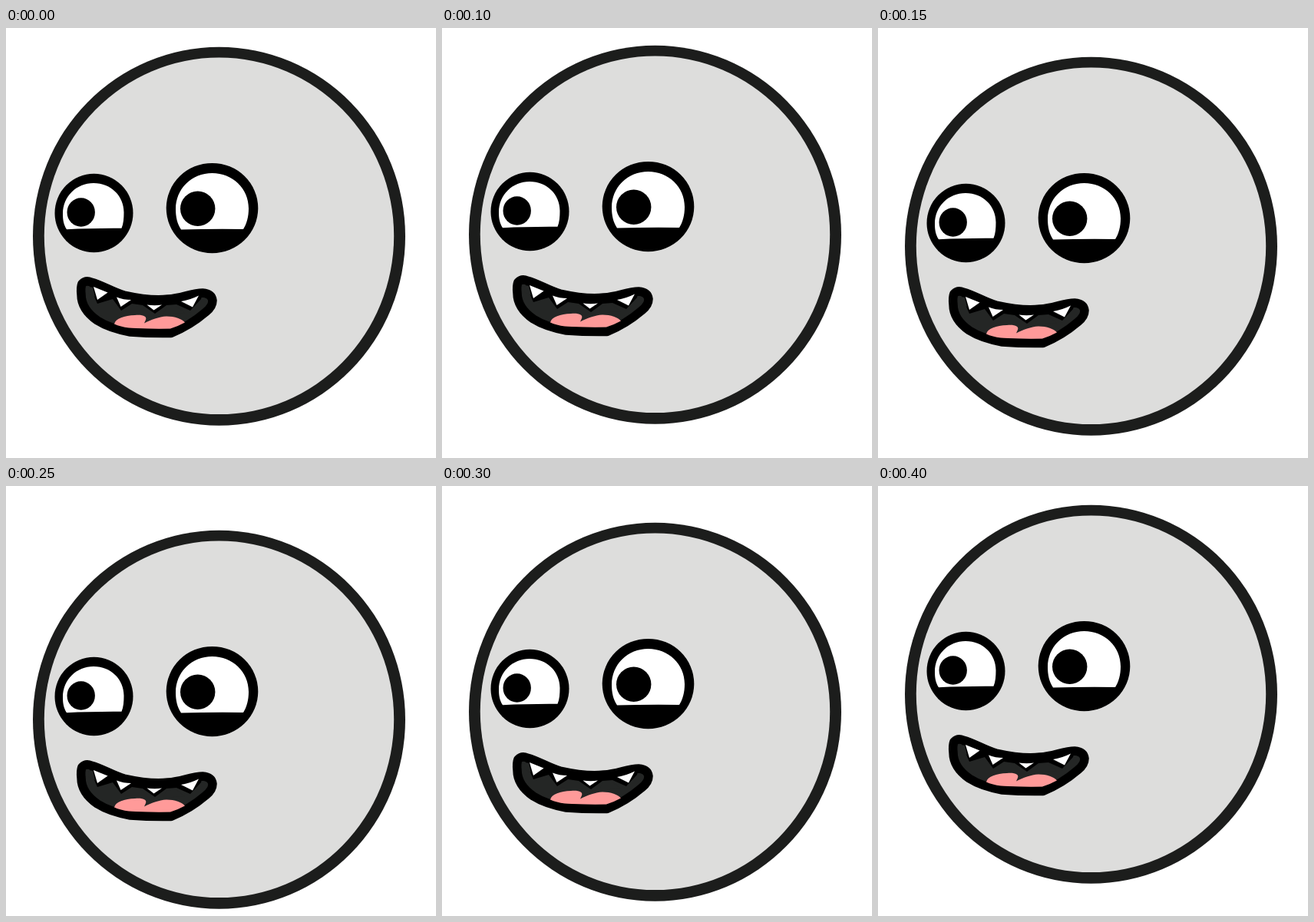
Recreate the animation shown at these times as an HTML page with a canvas. Size 560 by 560 pixels, loop 450 ms.

```html
<!DOCTYPE html>
<html lang="en">
<head>
<meta charset="utf-8">
<title>Bouncing face</title>
<style>
  html, body { margin: 0; width: 100%; height: 100%; overflow: hidden; background: #fff; }
  canvas { display: block; width: 560px; height: 560px; }
</style>
</head>
<body>
<canvas id="stage" width="560" height="560"></canvas>
<script>
const ctx = document.getElementById('stage').getContext('2d');
const STEP = 50;
// Vertical offset of the head for each step of the bounce
const BOUNCE = [0, -18, -2, 13, 23, 33, 23, 11, 0];

function oval(x, y, rx, ry, color) {
  ctx.beginPath();
  ctx.ellipse(x, y, rx, ry, 0, 0, Math.PI * 2);
  ctx.fillStyle = color;
  ctx.fill();
}

function paint(path, fill, line, width) {
  ctx.fillStyle = fill;
  ctx.fill(path);
  if (line) {
    ctx.strokeStyle = line;
    ctx.lineWidth = width;
    ctx.stroke(path);
  }
}

const eyeWhites = [
  new Path2D('M79 262.3C75 256 74 250 74 242C74 219 92 202 114 202C137 202 153.5 219 153.5 240C153.5 248 153 255 150.5 260.8Q112 260.5 79 262.3Z'),
  new Path2D('M228 262.5C223 255 221 246 221 236C221 209 242 189 268.5 189C295 189 316 209 316 235C316 246 313.5 255 309 262Q268 261.5 228 262.5Z')
];

const mouth = new Path2D('M99 333Q104 328 111 331C126 335 139 344 154 348C172 352 194 355 211 353C228 352 242 345 256 345Q268 346 269 355Q269 363 260 370C246 382 231 391 215 397.5Q188 398 162 396C145 393 130 388 119 381C106 372 98 360 98 347Q97 338 99 333Z');

const gums = new Path2D('M107 332L121 334L154 347Q180 353 211 352L256 345L254 353L240 368L222 360L209 361L194 372L178 361L164 359L150 368L139 353L119 359Z');

const teeth = [
  'M114 337L132.5 344.5L119 354Z',
  'M144 350.5Q153 354 163 354L149.5 363Z',
  'M183.5 360.5Q194 362 203 360.5L192.5 367.5Z',
  'M228 356Q240 354 251 348.5L243 363.5Z'
].map(d => new Path2D(d));

const tongue = new Path2D('M141 385.5C143 378 154 374.5 168 374C178 373 184 375.5 182 380L180 384.5C189 380 199 376 209 375.5C220 375.5 229 379 233 383.5Q225 388 214 391.5Q184 392 160 390.5Q149 389 141 385.5Z');

function drawFace() {
  oval(277.5, 271.3, 242.5, 246.5, '#1c1d1c');
  oval(277.5, 270.8, 227.7, 232.3, '#dddddc');

  oval(114.5, 241, 51, 51.2, '#000');
  oval(268.5, 234.6, 59.8, 58.7, '#000');
  eyeWhites.forEach(white => paint(white, '#fff'));
  oval(97.7, 240, 18.2, 18.7, '#000');
  oval(249.7, 235.3, 22.7, 22.7, '#000');

  paint(mouth, '#242625', '#000', 11.5);
  paint(gums, '#000');
  // Lighter patches between the teeth
  paint(new Path2D('M108 337L113 338L116 350L107 346Z'), '#242625');
  paint(new Path2D('M164 360L174 361L184 371L164 371L155 369Z'), '#242625');
  paint(new Path2D('M210 363L222 363L233 371L204 373Z'), '#242625');
  teeth.forEach(tooth => paint(tooth, '#fff'));
  paint(tongue, '#ff9a99');
}

function frame() {
  const offset = BOUNCE[Math.floor(performance.now() / STEP) % BOUNCE.length];
  ctx.setTransform(1, 0, 0, 1, 0, 0);
  ctx.fillStyle = '#fff';
  ctx.fillRect(0, 0, 560, 560);
  ctx.lineJoin = 'round';
  ctx.translate(0, offset);
  drawFace();
  requestAnimationFrame(frame);
}
frame();
</script>
</body>
</html>
```
